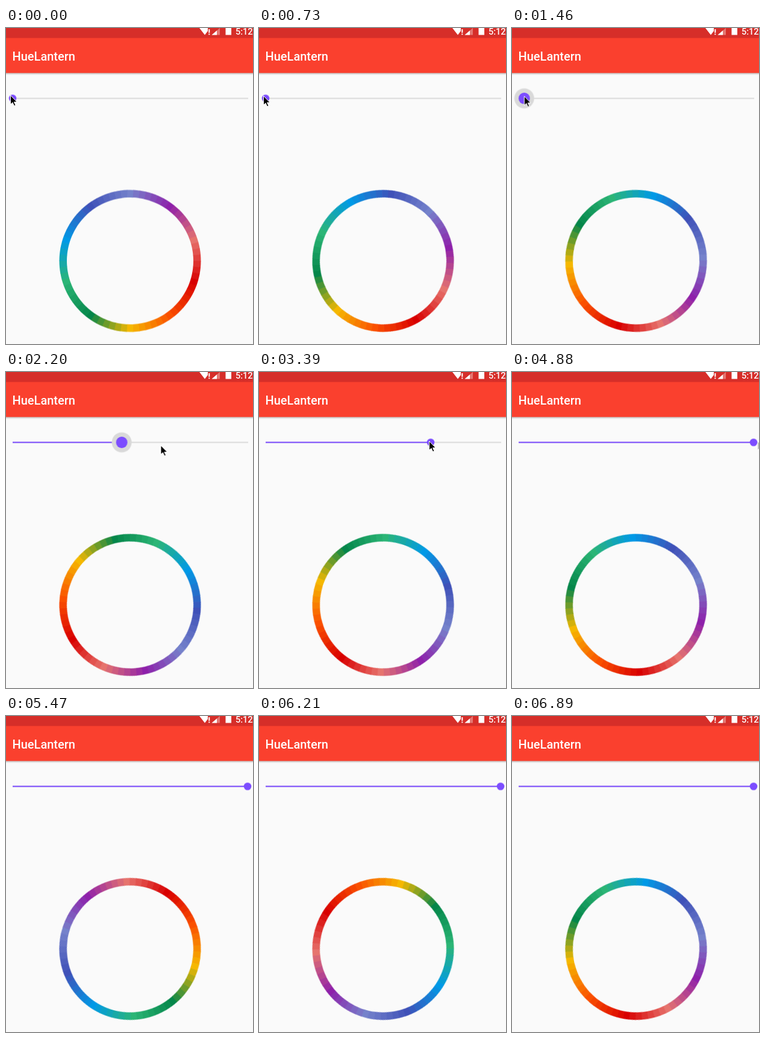
These frames come from a looping animation (410 px wide and 523 px high, 6990 ms). An HTML page:

```html
<!DOCTYPE html>
<html lang="en">
<head>
<meta charset="utf-8">
<title>Colour ring</title>
<style>
  html, body { margin: 0; width: 100%; height: 100%; overflow: hidden; background: #fafafa; }
  svg { display: block; width: 410px; height: 523px; }
  text { font-family: Roboto, sans-serif; font-weight: 500; fill: #fff; }
</style>
</head>
<body>
<svg viewBox="0 0 410 523">
  <defs>
    <linearGradient id="shade" x2="0" y2="1">
      <stop stop-color="#b9b9b9"/>
      <stop offset="1" stop-color="#fafafa"/>
    </linearGradient>
  </defs>
  <rect width="410" height="523" fill="#fafafa"/>
  <rect y="74" width="410" height="4" fill="url(#shade)"/>
  <rect y="16" width="410" height="58.5" fill="#fa402e"/>
  <rect width="410" height="16.5" fill="#d62e29"/>

  <g fill="#fff">
    <path d="M321 0H335V5L330 11.5Z"/>
    <path d="M336.3 2h2v6h-2zM336.3 9.3h2v2h-2z"/>
    <path d="M355 0V11.5H341.5Z" opacity=".35"/>
    <path d="M350 4.3V11.5H341.5Z"/>
    <path d="M364.5 0h9.5v11.5h-9.5z"/>
  </g>
  <text x="381" y="10.5" font-size="14.5">5:12</text>
  <text x="10.5" y="53.5" font-size="20">HueLantern</text>

  <rect x="11" y="115.5" width="391" height="2" fill="#dcdcdc"/>
  <rect id="fill" width="1" height="2" fill="#7c4dff"/>
  <circle id="halo" r="16.5" fill="#d9d9d9"/>
  <circle id="thumb" r="6.3" fill="#7c4dff"/>

  <g transform="translate(206 385.5)"><g id="ring" fill="none" stroke-width="12.5"></g></g>

  <path id="cursor" d="M.5 .5V15.5L4 12.3 6.6 18 9 17 6.5 11.5H11.2Z" fill="#000" stroke="#fff"/>
</svg>
<script>
const LOOP = 6990, LAST = 6890, TICK = 148;
const $ = id => document.getElementById(id);
const lerp = (a, b, f) => a + (b - a) * f;
const ramp = (t, from, to) => Math.min(1, Math.max(0, (t - from) / (to - from)));

// Ring: ten colours, 36 degrees apart, blended in seven steps each
const COLORS = ['7582cb', '8e20aa', 'e6746e', 'd80000', 'fa5000',
                'f5b800', '05864a', '2bb576', '0099e6', '3f51b8']
  .map(hex => [0, 2, 4].map(i => parseInt(hex.slice(i, i + 2), 16)));
const STEPS = 7, COUNT = COLORS.length * STEPS, R = 111.25;

function point(turn) {
  const a = turn * 2 * Math.PI;
  return `${R * Math.sin(a)} ${-R * Math.cos(a)}`;
}

for (let i = 0; i < COUNT; i++) {
  const n = Math.floor(i / STEPS);
  const next = COLORS[(n + 1) % COLORS.length];
  const mix = COLORS[n].map((c, k) => Math.round(lerp(c, next[k], i % STEPS / STEPS)));
  const arc = document.createElementNS('http://www.w3.org/2000/svg', 'path');
  // a slight overlap hides the seams
  arc.setAttribute('d', `M${point((i - .5) / COUNT)}A${R} ${R} 0 0 1 ${point((i + .56) / COUNT)}`);
  arc.setAttribute('stroke', `rgb(${mix})`);
  $('ring').append(arc);
}

// The ring turns faster as the slider moves right: [ms, degrees]
const SPIN = [[0, 0], [2200, 131], [3384, 470], [4864, 789], [6196, 1275], [LAST, 1520]];
function spin(t) {
  const i = Math.max(1, SPIN.findIndex(([end]) => end >= t));
  const [[t0, a], [t1, b]] = [SPIN[i - 1], SPIN[i]];
  return lerp(a, b, ramp(t, t0, t1));
}

// Two drags; the pointer runs ahead of the thumb in the first
const slide = t => 11 + 274 * ramp(t, 1420, 2600) + 116 * ramp(t, 3640, 4560);
const hold = (t, down, up) => ramp(t, down, down + 150) - ramp(t, up, up + 180);
const press = t => hold(t, 1310, 2780) + hold(t, 3490, 4640);
const mouseX = t => 7 + 275 * ramp(t, 1420, 2280) + 125 * ramp(t, 3640, 4700);
const mouseY = t => 111 + ramp(t, 0, TICK - 20) + 2 * ramp(t, 2200, 2600) + 9 * press(t) * ramp(t, 1420, 2200);

// The picture advances in held ticks
const times = [0];
for (let t = TICK - 20; t < LAST - TICK; t += TICK) times.push(t);
times.push(LAST);

function play(id, pose) {
  const keys = times.map(t => ({ offset: t / LOOP, easing: 'step-end', ...pose(t) }));
  keys.push({ ...keys[keys.length - 1], offset: 1 });
  $(id).animate(keys, { duration: LOOP, iterations: Infinity });
}

const knob = (t, size) => `translate(${slide(t)}px, 116.5px) scale(${size + press(t) / 2})`;

play('ring', t => ({ transform: `rotate(${spin(t)}deg)` }));
play('fill', t => ({ transform: `translate(11px, 115.5px) scale(${slide(t) - 11}, 1)` }));
play('thumb', t => ({ transform: knob(t, 1) }));
play('halo', t => ({ transform: knob(t, .5), opacity: press(t) }));
play('cursor', t => ({
  transform: `translate(${mouseX(t)}px, ${mouseY(t)}px)`,
  opacity: 1 - ramp(t, 4720, 4910)
}));
</script>
</body>
</html>
```
